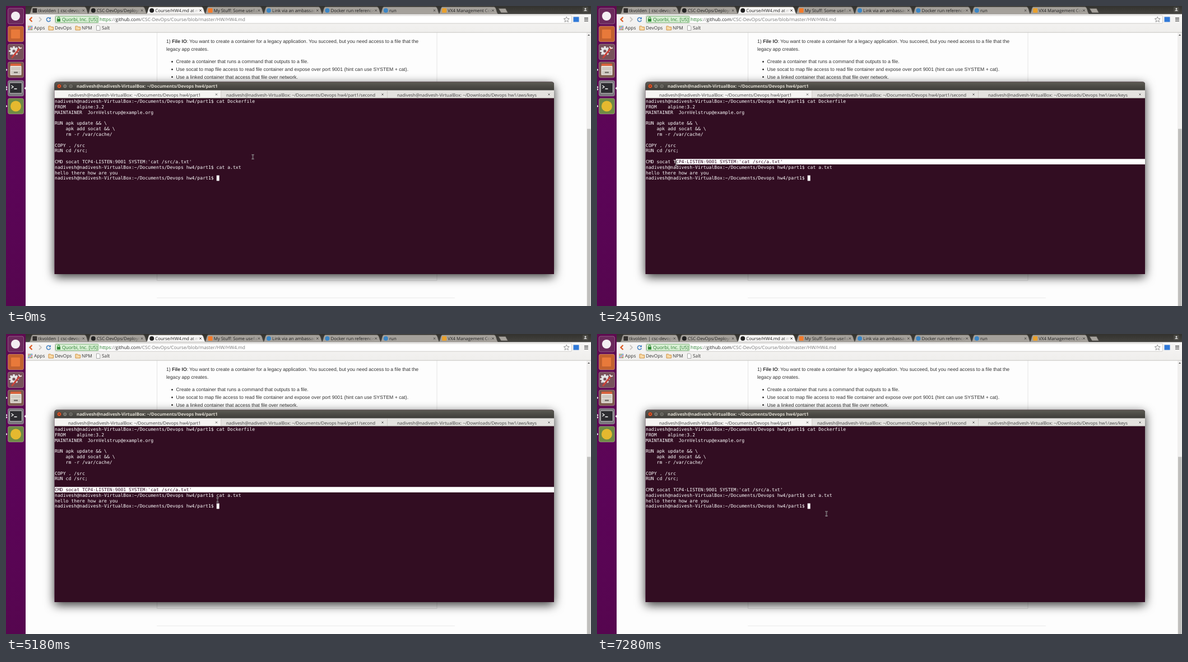
An HTML page that plays this animation: 1044 by 536 pixels, repeating every 8000 ms.

```html
<!DOCTYPE html>
<html lang="en">
<head>
<meta charset="utf-8">
<title>Terminal over a course page</title>
<style>
html, body { margin: 0; width: 100%; height: 100%; overflow: hidden; background: #fdfdfd; }
svg { display: block; }
#stage { width: 100%; height: 100%; }
text { white-space: pre; text-rendering: geometricPrecision; }
.ui { font-family: "Open Sans", "Noto Sans", sans-serif; }
.page { font: 8.7px "Liberation Sans", Arial, sans-serif; fill: #333; }
.mono { font: 8.13px "DejaVu Sans Mono", "Liberation Mono", monospace; }
</style>
</head>
<body>
<svg id="stage" viewBox="0 0 1044 536" xmlns="http://www.w3.org/2000/svg"></svg>
<script>
const LOOP = 8000, STEP = 70;
const LEFT = 87, RIGHT = 978, TOP = 165.6, CELL = 4.894, ROW = 9.786;
const HOST = 'nadivesh@nadivesh-VirtualBox:';
const PROMPT = HOST + '~/Documents/Devops hw4/part1$ ';
const LINES = [
  PROMPT + 'cat Dockerfile',
  'FROM    alpine:3.2',
  'MAINTAINER  JornVelstrup@example.org',
  '',
  'RUN apk update && \\',
  '    apk add socat && \\',
  '    rm -r /var/cache/',
  '',
  'COPY . /src',
  'RUN cd /src;',
  '',
  "CMD socat TCP4-LISTEN:9001 SYSTEM:'cat /src/a.txt'",
  PROMPT + 'cat a.txt',
  'hello there how are you',
  PROMPT
];
const CMD_ROW = 11, CAT_ROW = 12, CAT_COL = PROMPT.length;

// pointer path: time, x, y
const PATH = [
  [1050, 440.5, 269.5], [1540, 341.5, 277], [1680, 341.5, 277], [1750, 338.5, 276.5],
  [1820, 325, 278], [1960, 268, 282], [2100, 185, 279.5], [2240, 185, 279.5],
  [2380, 160, 281], [2660, 84, 282], [2800, 78, 282], [2870, 80.5, 278],
  [3150, 80.5, 278], [3290, 95, 274], [3570, 221.5, 295.5], [3710, 221.5, 295.5],
  [4130, 290, 299], [4550, 341.5, 285], [4690, 344.5, 285], [4760, 344.5, 285],
  [4900, 374.5, 296], [5110, 375.5, 296], [5180, 377.5, 296.5], [5320, 380, 295],
  [5530, 380, 295], [5670, 380, 294], [5740, 380, 294], [5810, 380, 293],
  [5880, 380, 293], [6020, 378, 288], [6090, 377, 288], [6300, 376, 297],
  [6510, 376, 298.5], [7000, 376, 298.5], [7280, 409.5, 321]
];

const esc = s => s.replace(/&/g, '&amp;').replace(/</g, '&lt;');
const rect = (x, y, w, h, fill, more = '') =>
  `<rect x="${x}" y="${y}" width="${w}" height="${h}" fill="${fill}" ${more}/>`;
const dot = (x, y, r, fill, more = '') => `<circle cx="${x}" cy="${y}" r="${r}" fill="${fill}" ${more}/>`;
const line = (d, color, w = 1, more = '') =>
  `<path d="${d}" fill="none" stroke="${color}" stroke-width="${w}" ${more}/>`;
const shape = (d, fill, more = '') => `<path d="${d}" fill="${fill}" ${more}/>`;
const label = (x, y, s, size, fill, more = '') =>
  `<text class="ui" x="${x}" y="${y}" font-size="${size}" fill="${fill}" ${more}>${esc(s)}</text>`;
const prose = (x, y, s) => `<text class="page" x="${x}" y="${y}">${s}</text>`;
const cross = (x, y, r, color, w) =>
  line(`M${x - r} ${y - r}l${2 * r} ${2 * r}m0 ${-2 * r}l${-2 * r} ${2 * r}`, color, w);
const ramp = (id, stops, dir = 'x2="0" y2="1"') =>
  `<linearGradient id="${id}" ${dir}>` + stops.map((c, i) =>
    `<stop offset="${i / (stops.length - 1)}" stop-color="${c}"/>`).join('') + '</linearGradient>';

function defs() {
  return '<defs>' +
    ramp('strip', ['#33322e', '#454440']) +
    ramp('dock', ['#5f0b50', '#5c0459', '#56064f']) +
    ramp('title', ['#5d5b54', '#3d3c38']) +
    ramp('bar', ['#f6f5f4', '#efeeec']) +
    ramp('fade', ['#a5a19b00', '#a5a19b'], '') +
    ramp('fadeOn', ['#f6f5f400', '#f6f5f4'], '') +
    `<filter id="shadow" x="-10%" y="-15%" width="120%" height="135%">
      <feDropShadow dx="0" dy="5" stdDeviation="9" flood-color="#000" flood-opacity=".8"/></filter>
    <clipPath id="picked"><path class="sel"/></clipPath></defs>`;
}

function page() {
  const bullets = [
    'Create a container that runs a command that outputs to a file.',
    'Use socat to map file access to read file container and expose over port 9001 (hint can use SYSTEM + cat).',
    'Use a linked container that access that file over network.'
  ];
  return rect(35, 47, 1009, 489, '#fdfdfd') +
    line('M269.5 47V490.5H769V47', '#dedede', .8) +
    line('M269 521.5H801', '#e8e8e8', .8) +
    prose(286, 66.2, '1) <tspan font-weight="bold">File IO</tspan>: You want to create a container for a ' +
      'legacy application. You succeed, but you need access to a file that the') +
    prose(286, 79.8, 'legacy app creates.') +
    bullets.map((s, i) => dot(296.5, 99.6 + i * 13.6, 1.5, '#333') + prose(303.5, 102.3 + i * 13.6, s)).join('') +
    rect(1036, 47, 8, 489, '#f0efee') + rect(1037, 219.5, 6.5, 317, '#c0bfbd') +
    shape('M1038 53l2-2.5 2 2.5z', '#555');
}

function tabs() {
  const list = [
    ['tkvolden | csc-devops', '#33302e', 0], ['CSC-DevOps/Deployment', '#222', 1],
    ['Course/HW4.md at master', '#222', 1], ['My Stuff: Some useful', '#f47b2a', 0],
    ['Link via an ambassador', '#3b86c6', 1], ['Docker run reference', '#3b86c6', 1],
    ['run', '#3b86c6', 1], ['VX4 Management Console', '#e9a02c', 0]
  ];
  const tab = ([name, color, round], i) => {
    const x = 41 + i * 104.4, on = i === 2;
    return shape(`M${x} 14.5C${x + 4} 13 ${x + 3} 2 ${x + 7} 1.6H${x + 99}C${x + 104} 2 ${x + 103} 13 ${x + 107} 14.5z`,
      on ? '#f6f5f4' : '#a5a19b', 'stroke="#56534e" stroke-width=".6"') +
      (round ? dot(x + 10.4, 8, 4, color) : rect(x + 6.4, 4, 8, 8, color, 'rx="1"')) +
      `<svg x="${x + 16.5}" y="0" width="77" height="14">` +
      label(0, 10.8, name, 7.86, '#1f1f1f') +
      rect(65, 2, 12, 12, on ? 'url(#fadeOn)' : 'url(#fade)') + '</svg>' +
      cross(x + 97.2, 8, 1.7, '#4a4845', 1);
  };
  const order = [0, 1, 3, 4, 5, 6, 7, 2];
  return rect(35, 0, 1009, 15, 'url(#strip)') + order.map(i => tab(list[i], i)).join('') +
    shape('M879 4.5h12.5l4 7.5h-12z', '#a5a19b', 'stroke="#56534e" stroke-width=".6"') +
    rect(1029, 1.5, 10, 10, '#4b4a45', 'rx="1"') +
    dot(1034, 5, 1.5, '#ddd') + shape('M1031 9q3-4 6 0z', '#ddd');
}

function toolbar() {
  const folder = x => shape(`M${x} 36h3.5l1 1.5h4v5.5h-8.5z`, '#f8d9a6', 'stroke="#c98632" stroke-width=".9"');
  const mark = (x, s) => label(x, 42.2, s, 8.3, '#333');
  const apps = [...Array(9)].map((_, i) => {
    const col = i % 3, row = Math.floor(i / 3);
    return rect(39.5 + col * 2.8, 35.5 + row * 2.8, 2, 2, ['#d9534a', '#5a9b4c', '#4a7ed0'][(col + row) % 3]);
  }).join('');
  return rect(35, 14.5, 1009, 33, 'url(#bar)') + line('M35 47.2H1044', '#bdbbb8', .8) +
    rect(87.5, 17, 922, 14, '#fff', 'rx="1.5" stroke="#bcb9b5" stroke-width=".7"') +
    line('M46.5 20l-4 4 4 4', '#dd5a22', 2.2) + line('M59 20l4 4-4 4', '#c9c6c2', 1.8) +
    line('M78.8 22.2a3.5 3.5 0 1 0 .5 3', '#4a86c5', 1.6) + shape('M80 19.5v4h-4z', '#4a86c5') +
    rect(88.5, 18.2, 76.5, 11.5, '#d9f0d5', 'rx="1.5" stroke="#62a85e" stroke-width=".8"') +
    rect(91, 23, 6, 4.8, '#2f8a35') + line('M92.3 23v-1.5a1.7 1.7 0 0 1 3.4 0v1.5', '#2f8a35', 1.1) +
    label(100, 27, 'Quorbi, Inc. [US]', 8.38, '#237a2a') +
    `<text class="ui" x="167" y="27" font-size="8.38" fill="#777"><tspan fill="#237a2a">https</tspan>://` +
    '<tspan fill="#222">github.com</tspan>/CSC-DevOps/Course/blob/master/HW/HW4.md</text>' +
    shape('M1000.3 19.2l1.4 3.2 3.5.3-2.7 2.3.9 3.5-3.1-1.9-3.1 1.9.9-3.5-2.7-2.3 3.5-.3z', '#fff', 'stroke="#777" stroke-width=".8"') +
    rect(1012.5, 19.5, 10, 9, '#3079d8') +
    line('M1032 21.5h7m-7 2.7h7m-7 2.7h7', '#555', 1.3) +
    apps + mark(50, 'Apps') + folder(76) + mark(87, 'DevOps') + folder(124) + mark(135, 'NPM') +
    shape('M161.5 35h4.3l2 2v6.5h-6.3z', '#fff', 'stroke="#888" stroke-width=".7"') + mark(171, 'Salt');
}

function dock() {
  const tile = (y, fill) => rect(3.5, y - 14, 28, 28, fill, 'rx="3" stroke="#fff" stroke-opacity=".35" stroke-width=".8"');
  const teeth = [...Array(8)].map((_, i) => rect(12.5, 72, 3, 17, '#e4e4e4', `transform="rotate(${i * 45} 14 80.5)"`)).join('');
  const arrow = y => shape(`M0 ${y - 2.2}l2.5 2.2-2.5 2.2z`, '#eee');
  return rect(0, 0, 35, 536, 'url(#dock)') +
    tile(18, '#6b2a5c') + dot(17, 18, 8, '#f3eef2') +
    tile(50, '#c2612f') + rect(9, 42, 16, 16, '#e8793a', 'rx="1"') +
    tile(82, '#77525a') + teeth + dot(14, 80.5, 6.5, '#e4e4e4') + dot(14, 80.5, 2.6, '#77525a') +
    line('M11 92L25 75', '#c9433a', 3, 'stroke-linecap="round"') + line('M22.5 72.5l2.2 3.2 3.4-.8', '#eee', 2) +
    tile(114, '#7c5a4d') + rect(8, 103, 19, 8, '#d8623c', 'rx="1"') + rect(7.5, 107, 20, 16.5, '#e8e3dc', 'rx="1"') +
    rect(9, 109, 17, 6, '#cfc9c1') + rect(9, 116, 17, 6, '#cfc9c1') + rect(14, 117.5, 7, 2.5, '#77716b') +
    tile(147, '#77757a') + rect(6.5, 137, 22, 19, '#2d2c31', 'rx="1.5" stroke="#cfcfcf" stroke-width="1"') +
    line('M9.5 142l3.5 2.5-3.5 2.5M14.5 148h5', '#fff', 1.3) +
    tile(179, '#6f8a45') + dot(17.5, 179, 9.5, '#e5b92f') +
    arrow(114) + arrow(145) + arrow(149) + arrow(179) + shape('M35 144.5l-2.5 2.5 2.5 2.5z', '#eee');
}

const rows = fill => `<g class="mono" fill="${fill}">` + LINES.map((s, i) =>
  `<text x="${LEFT}" y="${TOP + i * ROW + 7.7}">${esc(s)}</text>`).join('') + '</g>';

function terminal() {
  const name = HOST + ' ~/Documents/Devops hw4/part1';
  const tab = (x, s, close) => label(x, 161.6, s, 7.86, '#3c3c3c') + cross(close, 158, 1.5, '#555', .9);
  const button = (x, fill) => dot(x, 143.2, 3.8, fill, 'stroke="#32312d" stroke-width=".6"');
  return shape('M86.5 479V140q0-4.5 4.5-4.5H973.5q4.5 0 4.5 4.5V479z', '#300a24', 'filter="url(#shadow)"') +
    shape('M86.5 151V140q0-4.5 4.5-4.5H973.5q4.5 0 4.5 4.5V151z', 'url(#title)') +
    button(95, '#e2562a') + cross(95, 143.2, 1.3, '#4a1d0c', .8) +
    button(105.3, '#7d7b73') + line('M103.8 143.2h3', '#3a3935', .8) +
    button(115.7, '#7d7b73') + line('M114.3 141.8h2.8v2.8h-2.8z', '#3a3935', .7) +
    label(126, 146.2, name, 7.82, '#e3dfd5', 'font-weight="bold"') +
    rect(86.5, 150.5, 891.5, 14.3, '#e4e2df') + rect(87, 151, 296.5, 13.5, '#f5f4f2') +
    line('M86.5 164.5H978', '#8f8b85', .8) +
    line('M383.7 151.5V164M680.5 151.5V164', '#c4c0bb', .7) +
    tab(111, name, 375.5) + tab(393, name + '/second', 672) +
    tab(698, HOST + ' ~/Downloads/Devops hw1/aws/keys', 969) +
    rows('#fff') +
    rect(LEFT + CAT_COL * CELL, TOP + 14 * ROW, CELL, ROW, '#fff') +
    shape('', '#fff', 'class="sel"') +
    `<g clip-path="url(#picked)">${rows('#300a24')}</g>`;
}

function pointer() {
  const d = 'M-2-4Q0-4 0-2.8Q0-4 2-4M0-3V3M-2 4Q0 4 0 2.8Q0 4 2 4';
  return `<g id="pointer">${line(d, '#c4bcc2', 1.5)}${line(d, '#222', .6)}</g>`;
}

const stage = document.getElementById('stage');
stage.innerHTML = defs() + page() + tabs() + toolbar() + dock() + terminal() + pointer();
const beam = document.getElementById('pointer');
const picks = document.querySelectorAll('.sel');

function pointerAt(t) {
  const i = PATH.findIndex(k => k[0] > t);
  if (i === 0) return PATH[0].slice(1);
  if (i < 0) return PATH[PATH.length - 1].slice(1);
  const [t0, x0, y0] = PATH[i - 1], [t1, x1, y1] = PATH[i];
  const u = (t - t0) / (t1 - t0);
  return [x0 + (x1 - x0) * u, y0 + (y1 - y0) * u];
}

// a selected row runs from a column to the window edge
function band(row, col) {
  const x = LEFT + col * CELL;
  return `M${x} ${TOP + row * ROW}H${RIGHT}v${ROW}H${x}z`;
}

function selection(t, x) {
  if (t >= 1820 && t < 6020) {
    const col = t < 2800 ? Math.max(0, Math.floor((x - LEFT) / CELL)) : 0;
    return band(CMD_ROW, col);
  }
  if (t >= 6230 && t < 7070) return band(CAT_ROW, CAT_COL) + band(CAT_ROW + 1, 0);
  return '';
}

function draw(ms) {
  const t = Math.floor(ms % LOOP / STEP) * STEP;
  const [x, y] = pointerAt(t);
  beam.setAttribute('transform', `translate(${x} ${y})`);
  picks.forEach(p => p.setAttribute('d', selection(t, x)));
}

const start = performance.now();
function tick() {
  draw(performance.now() - start);
  requestAnimationFrame(tick);
}
draw(0);
requestAnimationFrame(tick);
</script>
</body>
</html>
```
